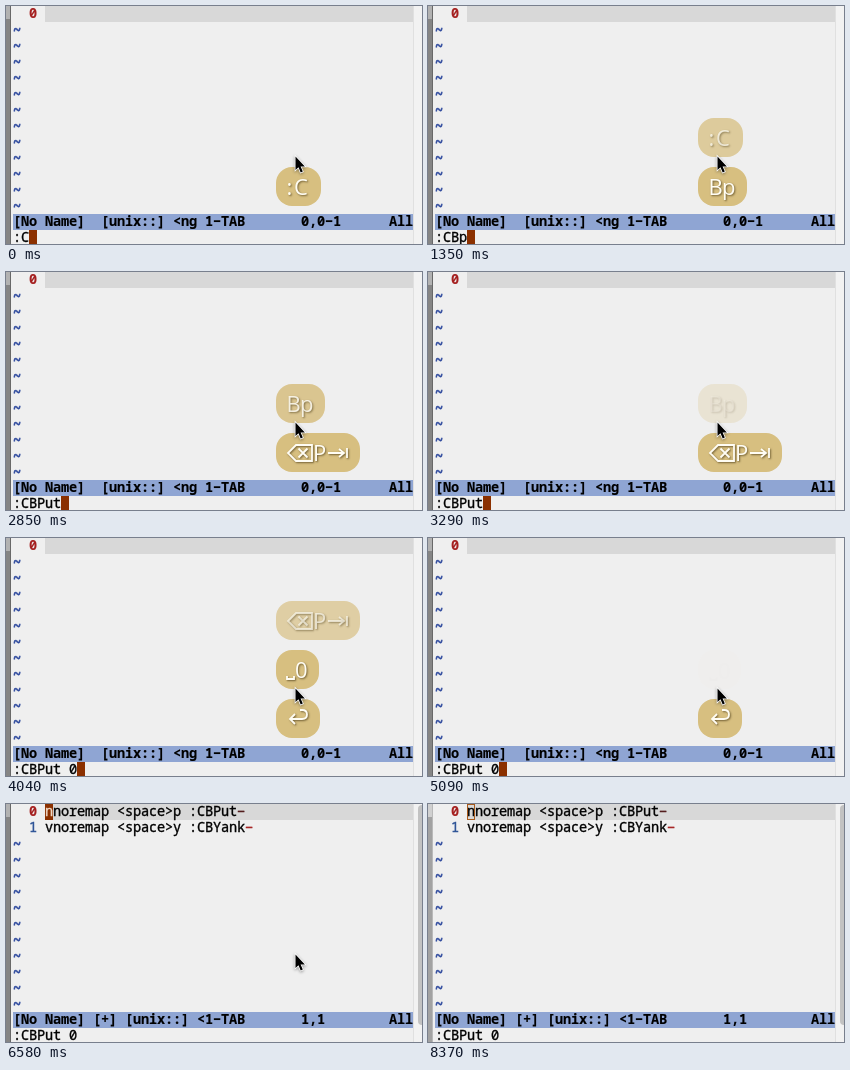
Write an HTML page with a canvas that moves like this. It is 416 by 238 pixels and loops after 8.39 s.

```html
<!DOCTYPE html>
<html>
<head>
<meta charset="utf-8">
<style>
html, body { margin: 0; width: 100%; height: 100%; overflow: hidden; background: #efefef; }
canvas { display: block; }
</style>
</head>
<body>
<canvas id="stage" width="416" height="238"></canvas>
<script>
const ctx = document.getElementById('stage').getContext('2d');
const LOOP = 8390, CELL = 8, LEFT = 7, ROW = 16;
const DONE = 6580, BLUR = 8370;

// Each track is a list of [start time, value...]; the latest started entry holds.
const at = (track, t) => track.filter(e => e[0] <= t).pop();

const typed = [[0, ':C'], [600, ':CB'], [1350, ':CBp'], [2100, ':CB'], [2400, ':CBP'],
  [2550, ':CBPut'], [3300, ':CBPut '], [3440, ':CBPut 0']];

const pointer = [[0, 289, 150], [7020, 292, 161], [7170, 305, 190], [7320, 320, 222], [7470, 0, 300]];

// keys: [time, width, [glyph, x]...]; rows: [time, y]; fade: [time, alpha]
const badges = [
  { keys: [[0, 45, [':', 10.5], ['C', 18]]],
    rows: [[0, 161], [600, 112]],
    fade: [[0, 1], [1350, .75], [1500, .5], [1650, .22], [1800, 0]] },
  { keys: [[600, 36, ['B', 10.5]], [1350, 49, ['B', 10.5], ['p', 24]]],
    rows: [[600, 161], [2100, 112]],
    fade: [[0, 1], [2850, .85], [3000, .55], [3150, .25], [3300, 0]] },
  { keys: [[2100, 49, ['erase', 12]], [2400, 62, ['erase', 12], ['P', 37]],
      [2550, 84, ['erase', 12], ['P', 37], ['tab', 52]]],
    rows: [[2100, 161], [3300, 112], [4040, 63]],
    fade: [[0, 1], [4040, .68], [4190, .3], [4340, 0]] },
  { keys: [[3300, 31, ['space', 11]], [3440, 43, ['space', 11], ['0', 19]]],
    rows: [[3300, 161], [4040, 112]],
    fade: [[0, 1], [4940, .4], [5090, .02], [DONE, 0]] },
  { keys: [[4040, 44, ['enter', 13]]],
    rows: [[4040, 161]],
    fade: [[0, 1], [5540, .45], [5680, 0]] }
];

const icons = {
  erase: 'M8 -8H24V8H8L0 0ZM10.5 -4.5L19.5 4.5M19.5 -4.5L10.5 4.5',
  tab: 'M0 0H16M11 -4L16 0L11 4M19 -5V5',
  space: 'M0 6V9H7V6',
  enter: 'M1 0H13Q18 0 18 -4.5Q18 -9 13 -9H11M6 -5L1 0L6 5'
};
for (const name in icons) icons[name] = new Path2D(icons[name]);
const arrow = new Path2D('M0 0V13.5L3 10.7L5.2 16L7.3 15.1L5.1 10H9.4Z');

function rect(color, x, y, w, h) {
  ctx.fillStyle = color;
  ctx.fillRect(x, y, w, h);
}

// A thin outline brings the strokes up to the terminal's heavier weight.
function text(str, col, base, color, weight = 400, outline = .35) {
  ctx.font = weight + ' 13.6px "Noto Sans Mono", "DejaVu Sans Mono", monospace';
  ctx.fillStyle = ctx.strokeStyle = color;
  ctx.lineWidth = outline;
  [...str].forEach((c, i) => {
    const x = LEFT + (col + i) * CELL;
    ctx.fillText(c, x, base);
    ctx.strokeText(c, x, base);
  });
}

const bold = (str, col, base, color) => text(str, col, base, color, 700, .1);

function drawEditor(t) {
  const done = t >= DONE, blurred = t >= BLUR;
  rect('#efefef', 0, 0, 416, 238);
  rect(blurred ? '#a2a2a2' : '#858585', 0, 0, 5, 238);
  rect(blurred ? '#d0d0d0' : '#b2b2b2', 0, 0, 5, 13);
  rect(blurred ? '#b9b9b9' : '#686868', 4, 0, 1, 238);
  rect('#e0e0e0', 407, 0, 1, 238);
  rect('#f2f2f2', 408, 0, 8, 238);
  rect('#d8d8d8', 39, 0, 368, ROW);

  bold('0', 2, 12, '#a52020');
  for (let r = done ? 2 : 1; r < 13; r++) text('~', 0, 12.7 + r * ROW, '#2f4a9e', 700, .5);

  rect('#8fa5d3', 7, 208, 400, ROW);
  const file = done ? '[No Name] [+] [unix::] <1−TAB' : '[No Name]  [unix::] <ng 1−TAB';
  bold(file, 0, 220, '#000');
  bold(done ? '1,1' : '0,0−1', 36, 220, '#000');
  bold('All', 47, 220, '#000');

  const line = at(typed, t)[1];
  text(line, 0, 235.5, '#000');
  if (!done) {
    rect('#8b3000', LEFT + line.length * CELL, 224, CELL, 14);
    return;
  }

  text('1', 2, 28, '#2f5597');
  if (!blurred) rect('#8b3000', 39, 0, CELL, ROW);
  text('n', 4, 12, blurred ? '#000' : '#f0d8c4');
  text('noremap <space>p :CBPut', 5, 12, '#000');
  text('−', 28, 12, '#501818');
  text('vnoremap <space>y :CBYank', 4, 28, '#000');
  text('−', 29, 28, '#a52020');
  if (blurred) {
    ctx.strokeStyle = '#a85a1c';
    ctx.lineWidth = 1;
    ctx.strokeRect(39.5, .5, 7, 15);
  }
  ctx.fillStyle = '#c2c2c2';
  ctx.beginPath();
  ctx.roundRect(412, 1, 8, 220, 4);
  ctx.fill();
}

function drawBadge({ keys, rows, fade }, t) {
  const key = at(keys, t), alpha = at(fade, t)[1];
  if (!key || !alpha) return;
  const [, width, ...glyphs] = key;
  ctx.save();
  ctx.globalAlpha = alpha;
  ctx.translate(270, at(rows, t)[1]);
  ctx.fillStyle = '#d7bf80';
  ctx.beginPath();
  ctx.roundRect(0, 0, width, 39, 16);
  ctx.fill();

  ctx.shadowColor = 'rgba(60, 45, 10, .65)';
  ctx.shadowBlur = 2;
  ctx.shadowOffsetX = ctx.shadowOffsetY = 1;
  ctx.fillStyle = ctx.strokeStyle = '#fffdf4';
  ctx.lineWidth = 1.8;
  ctx.font = '22px "Open Sans", "Noto Sans", sans-serif';
  for (const [glyph, x] of glyphs) {
    if (icons[glyph]) {
      ctx.save();
      ctx.translate(x, 20);
      ctx.stroke(icons[glyph]);
      ctx.restore();
    } else ctx.fillText(glyph, x, 28);
  }
  ctx.restore();
}

function drawPointer(t) {
  const [, x, y] = at(pointer, t);
  ctx.save();
  ctx.translate(x + .5, y + .5);
  ctx.shadowColor = 'rgba(0, 0, 0, .4)';
  ctx.shadowBlur = 3;
  ctx.shadowOffsetY = 1;
  ctx.strokeStyle = '#fff';
  ctx.lineWidth = 1.6;
  ctx.stroke(arrow);
  ctx.shadowColor = 'transparent';
  ctx.fillStyle = '#000';
  ctx.fill(arrow);
  ctx.restore();
}

function frame() {
  const t = performance.now() % LOOP;
  drawEditor(t);
  badges.forEach(b => drawBadge(b, t));
  drawPointer(t);
  requestAnimationFrame(frame);
}
frame();
</script>
</body>
</html>
```
